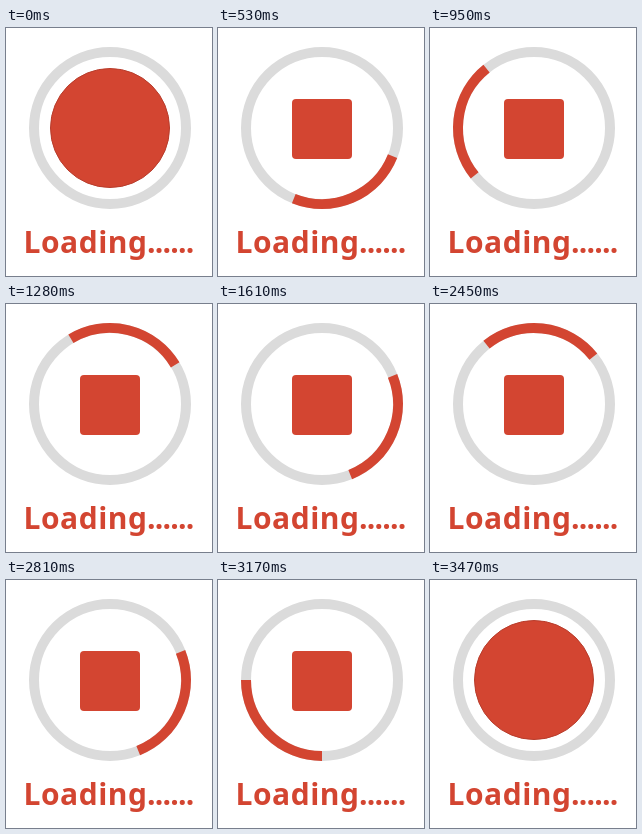
Recreate the animation shown at these times as an HTML page. Size 206 px wide and 248 px high, loop 3.5 s.

```html
<!DOCTYPE html>
<html lang="en">
<head>
<meta charset="utf-8">
<title>Loading</title>
<style>
  html, body { margin: 0; width: 100%; height: 100%; overflow: hidden; background: #fff; }
  svg { display: block; width: 206px; height: 248px; }
  .ring { fill: none; stroke-width: 10; }
  text { font: 600 30px "Noto Sans", sans-serif; fill: #d34531; letter-spacing: .5px; }
  .dots { letter-spacing: -.8px; }
</style>
</head>
<body>
<svg viewBox="0 0 206 248">
  <circle class="ring" cx="104" cy="100" r="76" stroke="#dbdbdb"/>
  <circle id="idle" cx="104" cy="100" r="59.5" fill="#d34531" stroke="#b83d2c"/>
  <g id="busy" visibility="hidden">
    <path id="arc" class="ring" d="M104 24A76 76 0 0 1 180 100" stroke="#d34531"/>
    <rect x="74" y="71" width="60" height="60" rx="4" fill="#d34531"/>
  </g>
  <text x="17.5" y="225">Loading<tspan class="dots" x="141">......</tspan></text>
</svg>
<script>
  const LOOP = 3500, HOLD = 170, STEP = 30, SPIN_STEPS = 110;
  const [idle, busy, arc] = ['idle', 'busy', 'arc'].map(id => document.getElementById(id));
  const show = (el, on) => el.setAttribute('visibility', on ? 'visible' : 'hidden');

  // The arc's tip follows a point moving evenly along a square's perimeter.
  function tipAngle(step) {
    const a = step * 9, side = Math.round(a / 90) * 90;
    return side + Math.atan((a - side) / 45) * 180 / Math.PI;
  }

  function draw() {
    const t = performance.now() % LOOP;
    const step = Math.floor((t - HOLD) / STEP);
    const spinning = step >= 0 && step < SPIN_STEPS;
    show(idle, !spinning);
    show(busy, spinning);
    if (spinning) arc.setAttribute('transform', `rotate(${tipAngle(step)} 104 100)`);
    requestAnimationFrame(draw);
  }
  draw();
</script>
</body>
</html>
```
